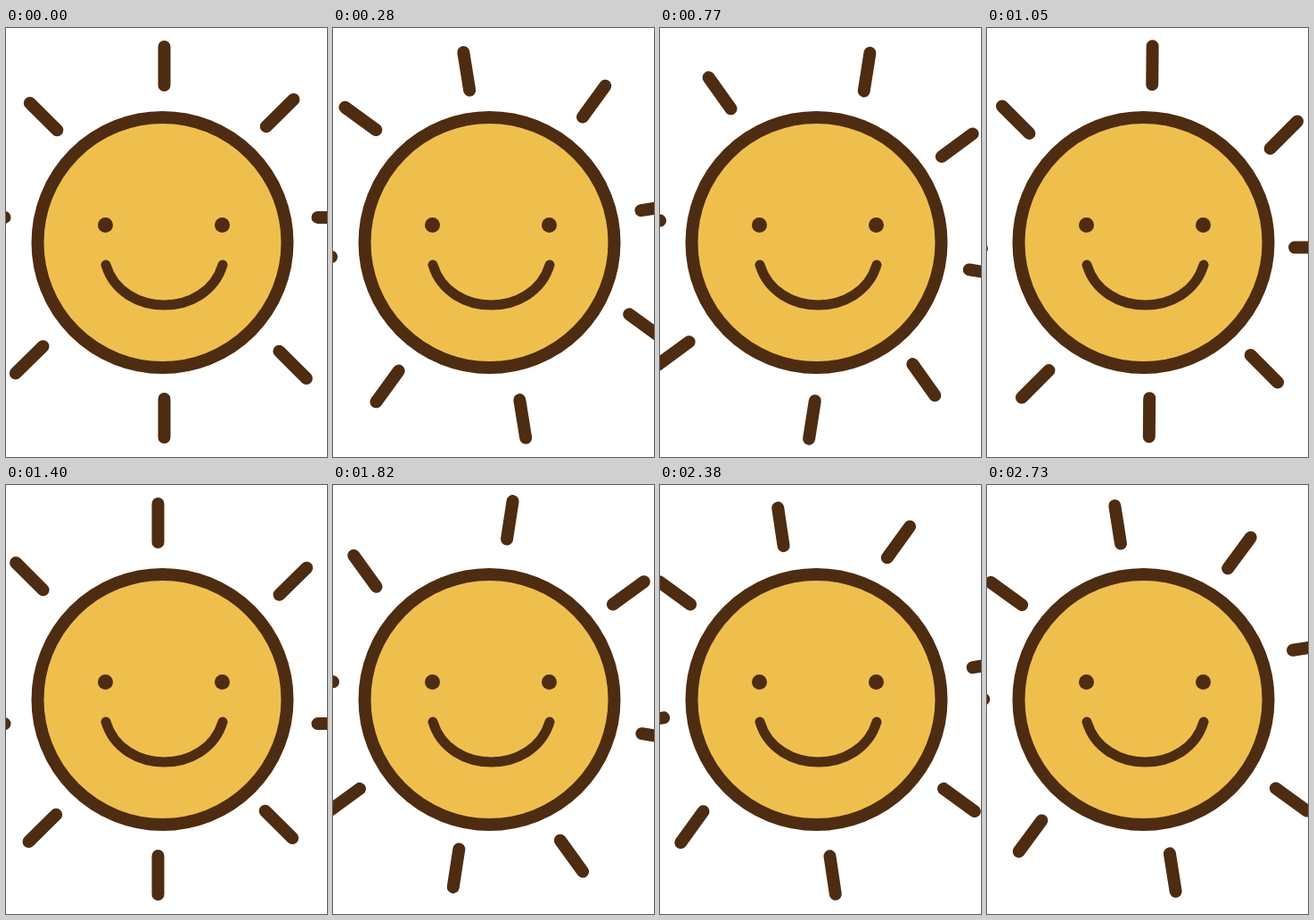
Recreate the animation shown at these times as an HTML page. Size 360 px wide and 480 px high, loop 2800 ms.

```html
<!DOCTYPE html>
<html lang="en">
<head>
<meta charset="utf-8">
<title>Smiling sun</title>
<style>
  html, body { margin: 0; width: 100%; height: 100%; overflow: hidden; background: #fff; }
  svg { display: block; width: 100%; height: 100%; }
</style>
</head>
<body>
<svg viewBox="0 0 360 480" fill="none" stroke="#4e2c11" stroke-linecap="round">
  <!-- Each line spans the sun; its long gap leaves two opposite rays -->
  <g id="rays" stroke-width="14" stroke-dasharray="43 351">
    <path d="M0-218.5V218.5" transform="translate(3.5)"/>
    <path d="M0-218.5V218.5" transform="rotate(45.5) translate(-9.7 .8)"/>
    <path d="M0-218.5V218.5" transform="rotate(90) translate(-27.6)"/>
    <path d="M0-218.5V218.5" transform="rotate(134.8) translate(-6.6 -4.5)"/>
  </g>
  <circle cx="175.5" cy="240" r="140" fill="#efbf4e" stroke-width="14"/>
  <g fill="#4e2c11" stroke="none">
    <circle cx="111.5" cy="220.5" r="8.5"/>
    <circle cx="242.5" cy="220.5" r="8.5"/>
  </g>
  <path d="M112 265C130 325 225 325 243 265" stroke-width="11"/>
</svg>
<script>
  const LOOP = 2800, STEP = 70;
  const rays = document.getElementById('rays');

  // One clockwise turn per loop, in discrete steps
  function draw() {
    const time = Math.floor(performance.now() % LOOP / STEP) * STEP;
    rays.setAttribute('transform', `translate(174 239.5) rotate(${time / LOOP * 360})`);
    requestAnimationFrame(draw);
  }
  draw();
</script>
</body>
</html>
```
